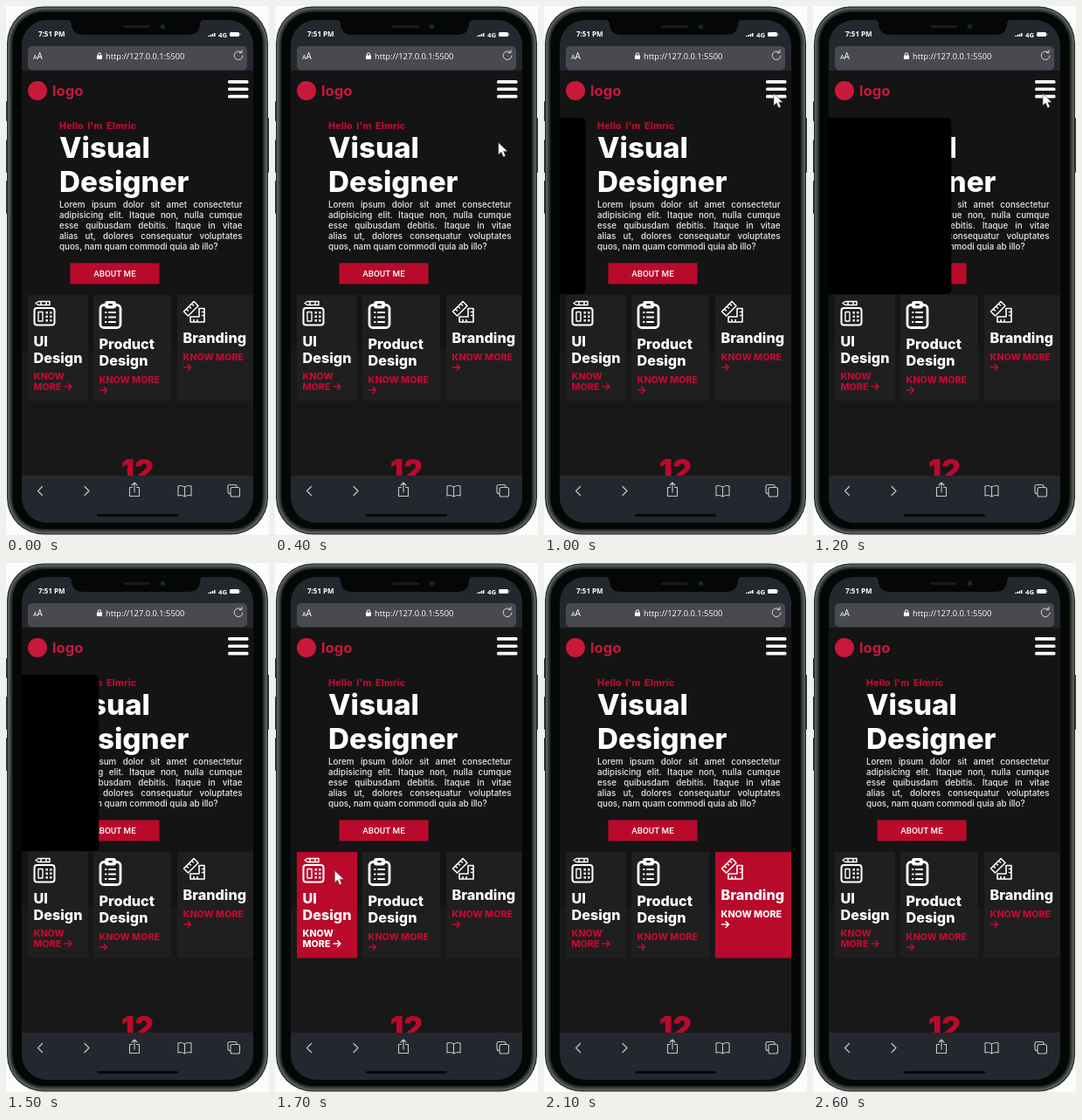
An HTML page with a canvas for the animation above (3.4 s loop, 301x606 px).

```html
<!DOCTYPE html>
<html lang="en">
<head>
<meta charset="utf-8">
<title>Mobile portfolio</title>
<style>
html, body { margin: 0; width: 100%; height: 100%; overflow: hidden; background: #fdfbfb; }
canvas { display: block; }
</style>
</head>
<body>
<canvas id="stage" width="301" height="606"></canvas>
<script>
const ctx = document.getElementById('stage').getContext('2d');
const LOOP = 3400, STEP = 100;
const RED = '#ba0a2b', TEXT_RED = '#c00b30', WHITE = '#fff';
const BAR = '#24272e', BEZEL = '#050606', CARD = '#1f1f1f';
const SANS = 'Inter, sans-serif', UI = '"Open Sans", sans-serif';

function box(x, y, w, h, r, fill) {
  ctx.beginPath();
  ctx.roundRect(x, y, w, h, r);
  ctx.fillStyle = fill;
  ctx.fill();
}

function outline(x, y, w, h, r, color, width) {
  ctx.beginPath();
  ctx.roundRect(x, y, w, h, r);
  ctx.strokeStyle = color;
  ctx.lineWidth = width;
  ctx.stroke();
}

function line(d, color, width) {
  ctx.strokeStyle = color;
  ctx.lineWidth = width;
  ctx.lineCap = ctx.lineJoin = 'round';
  ctx.stroke(new Path2D(d));
}

function dot(x, y, r, color) {
  ctx.beginPath();
  ctx.arc(x, y, r, 0, 7);
  ctx.fillStyle = color;
  ctx.fill();
}

function text(str, x, y, size, color = WHITE, weight = 800, family = SANS, align = 'left') {
  ctx.font = `${weight} ${size}px ${family}`;
  ctx.textAlign = align;
  ctx.fillStyle = color;
  ctx.fillText(str, x, y);
}

function justified(str, x, y, width, size) {
  ctx.font = `500 ${size}px ${SANS}`;
  const words = str.split(' ');
  const used = words.reduce((sum, word) => sum + ctx.measureText(word).width, 0);
  const gap = (width - used) / (words.length - 1);
  for (const word of words) {
    text(word, x, y, size, '#e9e9e9', 500);
    x += ctx.measureText(word).width + gap;
  }
}

function drawBody() {
  ctx.fillStyle = '#fdfbfb';
  ctx.fillRect(0, 0, 301, 606);
  for (const [y, h] of [[109, 23], [153, 38], [200, 38]]) box(0, y, 3, h, 1, '#323937');
  box(298, 128, 3, 63, 1, '#323937');
  // Metal rim, from the outer edge inwards.
  const rings = [[1, '#252c2a'], [2.2, '#59635f'], [4, '#3a4340'], [6, '#202624'], [7.5, BEZEL]];
  for (const [inset, color] of rings) {
    box(inset, inset - 0.5, 301 - 2 * inset, 607 - 2 * inset, 43 - inset, color);
  }
}

function drawStatus() {
  ctx.fillStyle = BAR;
  ctx.fillRect(18, 16, 265, 58);
  ctx.fillStyle = BEZEL;
  ctx.fill(new Path2D('M69 15q6 1 6 6q1 12 13 12h121q12 0 13-12q0-5 6-6z'));
  box(134, 22, 31, 3, 1.5, '#191b1e');
  dot(179.5, 23.5, 3.5, '#10151f');
  dot(179.5, 23.5, 1.6, '#1b3159');
  text('7:51 PM', 37, 35, 8, WHITE, 700, UI);
  for (let i = 0; i < 4; i++) box(231 + i * 2.3, 34 - i, 1.6, 1 + i, 0, WHITE);
  text('4G', 243, 36, 7.8, WHITE, 700, UI);
  box(256, 30, 11, 5, 1.5, WHITE);
  box(267.5, 31.5, 1, 2, 0, '#aaa');

  box(25, 46, 251, 27.5, 5, '#484a50');
  text('A', 31, 61, 7.5, WHITE, 400, UI);
  text('A', 35.5, 61, 10, WHITE, 400, UI);
  box(104, 56.5, 6, 4.5, 0.8, WHITE);
  line('M105.3 57v-1.6a1.7 1.7 0 0 1 3.4 0v1.6', WHITE, 1);
  text('http://127.0.0.1:5500', 114, 61, 9.3, WHITE, 400, UI);
  line('M269.5 53.2A4.9 4.9 0 1 0 271 57M270 50.6v3h-3', '#d5d6d8', 1);
}

function drawHero() {
  ctx.fillStyle = '#141414';
  ctx.fillRect(18, 74, 265, 320);
  ctx.fillStyle = '#181818';
  ctx.fillRect(18, 394, 265, 144);

  dot(36, 97, 11, '#c8193b');
  text('logo', 53, 103, 16.6, '#c8193b', 700);
  for (const y of [85, 93.4, 101.8]) box(254, y, 23.5, 3.7, 1.5, WHITE);

  ctx.letterSpacing = '0.2px';
  ctx.wordSpacing = '2px';
  text("Hello I'm Elmric", 61, 141, 10.6, TEXT_RED);
  ctx.letterSpacing = ctx.wordSpacing = '0px';
  text('Visual', 61, 174, 33.2);
  text('Designer', 61, 213, 33.2);
  const lines = [
    'Lorem ipsum dolor sit amet consectetur',
    'adipisicing elit. Itaque non, nulla cumque',
    'esse quibusdam debitis. Itaque in vitae',
    'alias ut, dolores consequatur voluptates',
  ];
  lines.forEach((str, i) => justified(str, 61, 231 + i * 12, 209.5, 9.8));
  text('quos, nam quam commodi quia ab illo?', 61, 279, 9.8, '#e9e9e9', 500);

  box(73.5, 294.5, 102, 24, 0, RED);
  text('ABOUT ME', 124.5, 310, 9.8, WHITE, 500, 'Roboto, sans-serif', 'center');
  text('12', 150.5, 543.5, 34, RED, 900, SANS, 'center');
}

function arrow(x, y, color) {
  line(`M${x} ${y}h8M${x + 4.7} ${y - 3.3}l3.3 3.3l-3.3 3.3`, color, 1.6);
}

function uiIcon() {
  outline(32.5, 346, 23, 19.5, 3, WHITE, 2);
  line('M34 340.5l3-2h13v4h-13zM40 338.5v4M46 338.5v4', WHITE, 1.5);
  outline(37, 350.5, 5, 10.5, 0.5, WHITE, 1.4);
  for (const x of [45.5, 50]) for (const y of [350, 354.5, 359]) box(x, y, 2.5, 2.5, 0.3, WHITE);
}

function clipboardIcon() {
  outline(108, 342.5, 23, 26, 4, WHITE, 2.8);
  box(113, 338, 13, 8.5, 3, WHITE);
  box(117, 341, 5, 2.2, 1, CARD);
  line('M114 351h.5M118 351h7M114 356.5h.5M118 356.5h7M114 362h.5M118 362h7', WHITE, 2.2);
}

function rulerIcon() {
  line('M203.5 350l11.5-11.5l5 5l-11.5 11.500zM206.500 347l2 2M209.500 344l2 2M212.500 341l2 2', WHITE, 1.6);
  line('M221 346.500h6v15.500h-16v-6h10zM224.500 350.500h2M224.500 354.500h2M215 359.500v2M219 359.500v2', WHITE, 1.6);
}

const cards = [
  { x: 25, w: 69, icon: uiIcon, title: ['UI', 'Design'], titleY: 390, link: ['KNOW', 'MORE'], linkY: 428, arrow: [67, 436] },
  { x: 100, w: 89, icon: clipboardIcon, title: ['Product', 'Design'], titleY: 393, link: ['KNOW MORE'], linkY: 432, arrow: [107.5, 440] },
  { x: 196, w: 87, icon: rulerIcon, title: ['Branding'], titleY: 386, link: ['KNOW MORE'], linkY: 406, arrow: [203.5, 414] },
];

function drawCard(card, hovered) {
  box(card.x, 331, card.w, 121.5, 0, hovered ? RED : CARD);
  const color = hovered ? WHITE : TEXT_RED;
  const left = card.x + 6.5;
  card.icon();
  card.title.forEach((str, i) => text(str, left, card.titleY + i * 18.5, 16.2));
  card.link.forEach((str, i) => text(str, left, card.linkY + i * 12, 10.7, color));
  arrow(...card.arrow, color);
}

function drawToolbar() {
  ctx.fillStyle = BAR;
  ctx.fillRect(18, 538, 265, 54);
  const color = '#c4c6ca';
  line('M41.5 550.5l-5 5l5 5M90 550.5l5 5l-5 5', color, 1.2);
  line('M144.5 551.5h-3v10h11v-10h-3M147 557v-11M144 549l3-3l3 3', color, 1.1);
  line('M204.5 551q-4-2.5-7.5-1v11q3.5-1.5 7.5 1q4-2.5 7.5-1v-11q-3.5-1.5-7.5 1v11', color, 1.1);
  outline(254, 548.5, 10, 10, 2, color, 1.1);
  box(257, 551.5, 10.5, 10.5, 2, BAR);
  outline(257, 551.5, 10.5, 10.5, 2, color, 1.1);
  box(104, 582, 93, 3, 1.5, '#08090b');
}

function drawCursor(x, y) {
  const shape = new Path2D(`M${x} ${y}v13.5l3.2-3l2.3 5.5l2.5-1l-2.3-5.3h4.3z`);
  ctx.fillStyle = WHITE;
  ctx.fill(shape);
  ctx.lineWidth = 0.6;
  ctx.strokeStyle = '#555';
  ctx.stroke(shape);
}

const clamp = v => Math.min(1, Math.max(0, v));
const smooth = v => v * v * (3 - 2 * v);
const easeOut = v => 1 - (1 - v) ** 2;

function panelWidth(t) {
  const full = 165;
  return t < 1450
    ? full * smooth(clamp((t - 890) / 410))
    : full * (1 - easeOut(clamp((t - 1430) / 260)));
}

function glide(t, t0, t1, from, to) {
  const k = easeOut(clamp((t - t0) / (t1 - t0)));
  return from.map((v, i) => v + (to[i] - v) * k);
}

function cursorAt(t) {
  if (t >= 300 && t < 800) return glide(t, 200, 700, [243, 245], [263, 107]);
  if (t >= 800 && t < 1500) return glide(t, 700, 1000, [263, 107], [263, 100.5]);
  if (t >= 1700 && t < 2000) return glide(t, 1600, 1900, [55, 325], [79, 374.5]);
  if (t >= 2000 && t < 2100) return [163, 378];
  return null;
}

function hoveredCard(t) {
  if (t >= 1700 && t < 2000) return 0;
  if (t >= 2000 && t < 2100) return 1;
  if (t >= 2100 && t < 2300) return 2;
  return -1;
}

function render(t) {
  drawBody();
  ctx.save();
  ctx.beginPath();
  ctx.roundRect(18, 16, 265, 576, 29);
  ctx.clip();
  drawHero();
  const hovered = hoveredCard(t);
  cards.forEach((card, i) => drawCard(card, i === hovered));
  const width = panelWidth(t);
  if (width > 0) box(18, 128, width, 202, [0, 5, 5, 0], '#000');
  drawStatus();
  drawToolbar();
  const cursor = cursorAt(t);
  if (cursor) drawCursor(...cursor);
  ctx.restore();
}

const start = performance.now();
function tick() {
  const elapsed = (performance.now() - start) % LOOP;
  render(Math.floor(elapsed / STEP) * STEP);
  requestAnimationFrame(tick);
}
tick();
</script>
</body>
</html>
```
